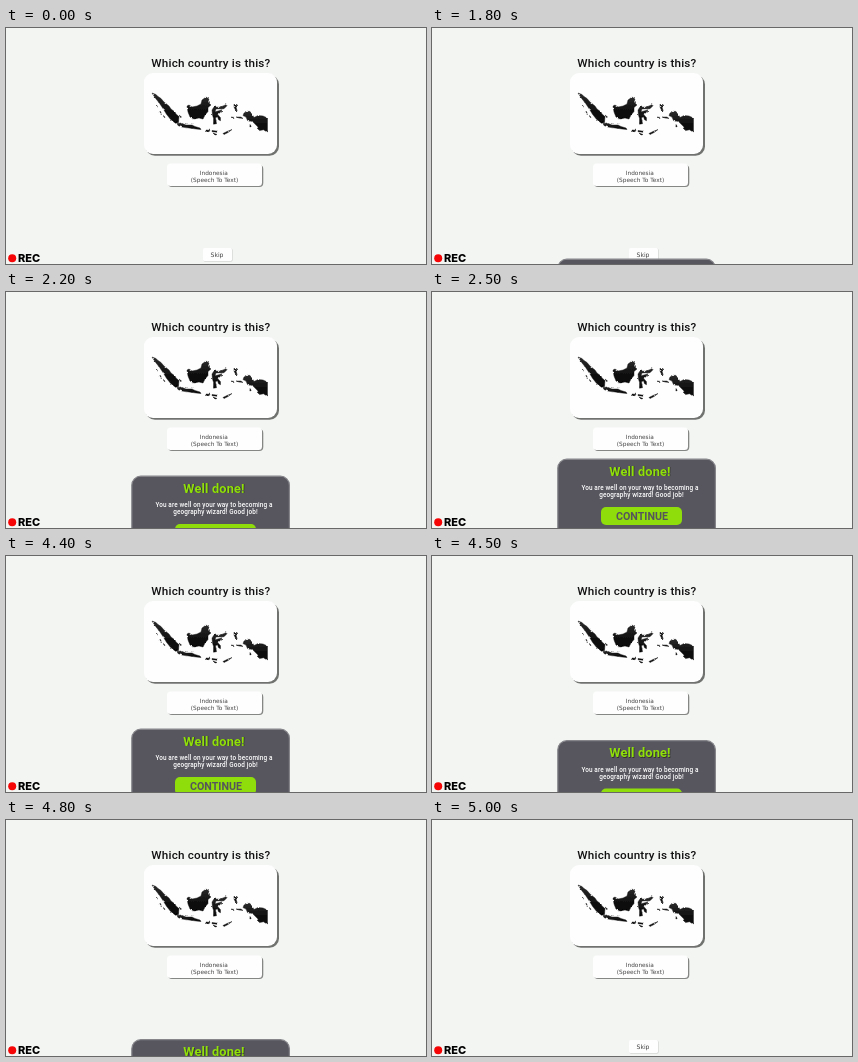
Write an HTML page that moves like this. It is 420 px wide and 236 px high and loops after 5.1 s.

```html
<!DOCTYPE html>
<html lang="en">
<head>
<meta charset="utf-8">
<title>Country quiz</title>
<style>
html, body { margin: 0; width: 100%; height: 100%; overflow: hidden; background: #f3f5f3; }
svg { display: block; width: 420px; height: 236px; }
text { text-anchor: middle; }
.bold { font-family: Roboto, sans-serif; font-weight: 700; }
.medium { font-family: Roboto, sans-serif; font-weight: 500; }
.ui { font-family: "DejaVu Sans", sans-serif; fill: #444; }
.rec { font: 800 11px Inter, sans-serif; text-anchor: start; }
.box { fill: #fdfefd; }
.land { fill: url(#ink); stroke: #0b0b0b; stroke-width: .4; filter: url(#coast); }

/* The panel moves at ten steps per second: up at 1.8 s, down at 4.4 s. */
.panel { animation: slide 5100ms step-end infinite; }
@keyframes slide {
  0% { transform: translateY(80px); }
  35.29% { transform: translateY(64px); }
  37.25% { transform: translateY(52.5px); }
  39.21% { transform: translateY(41px); }
  41.17% { transform: translateY(29px); }
  43.13% { transform: translateY(17px); }
  45.09% { transform: translateY(0); }
  86.27% { transform: translateY(6px); }
  88.23% { transform: translateY(17.5px); }
  90.19% { transform: translateY(29.2px); }
  92.15% { transform: translateY(41px); }
  94.11% { transform: translateY(52.5px); }
  96.07% { transform: translateY(63.5px); }
  98.03%, 100% { transform: translateY(80px); }
}
</style>
</head>
<body>
<svg viewBox="0 0 420 236">
  <defs>
    <linearGradient id="ink" x1="0" y1="0" x2="0" y2="1">
      <stop offset="0" stop-color="#2a2a2a"/>
      <stop offset=".6" stop-color="#101010"/>
      <stop offset="1" stop-color="#050505"/>
    </linearGradient>
    <filter id="coast">
      <feTurbulence type="fractalNoise" baseFrequency=".35" seed="4"/>
      <feDisplacementMap in="SourceGraphic" scale="2.5" xChannelSelector="R" yChannelSelector="G"/>
    </filter>
  </defs>

  <text class="medium" x="204.900" y="38.800" font-size="11.7" letter-spacing=".2" fill="#111">Which country is this?</text>

  <rect x="139.500" y="47" width="133.500" height="80.800" rx="9.500" fill="#707270"/>
  <rect class="box" x="138" y="45" width="133" height="81" rx="9"/>

  <g class="land">
    <path d="M146 65l4 1.500 2 2 3 2 3 3.500 5 4 2 3 4 3 1 2 3 2.500-.5 6-3 .8-5-4-4-5-3-5-4-6-4-5z"/>
    <path d="M171 95.500l4-.5 5 2 6 0 3 1.500 5 1.500 1 1.500-5-.5-7-1-7-1-4-1.500z"/>
    <path d="M181 78l2-1 3 2 5-1 4-2 1-4 4-3 3 2-1 3 3 3-3 2.500 0 4-3 3.500-2 4-4-1-5 1-4-2-2-5z"/>
    <path d="M206 82l2-3 6 .2 6-2.500 1 1-3 3-8 .2-1 2.800 4-1 3-1-2 3-2.500 1.500 3 3.500 0 3-2-1-1-3-2 1 1 6-3 .5 0-6-1-3z"/>
    <path d="M228 76l1.500 1.500 1.500-1.500-.8 3.500 1 3.500-1.700-1-1.500-3z"/>
    <path d="M238 85l4-2 4 3 2 3.500 4-2 5 .5 4.500 2 0 14.300-4-2.500-4 .8-2-4-5-5-5-1-1.500-3.500-3-1.500z"/>
    <path d="M225 89l4 .5-2 1.200zM230 89l5 0 2 1.500-4-.5zM200 102l4 .2-1 1.500-3-.5zM206 102.500l6 .7-1 1-5-.5zM207 105l4 1.500-2 .5zM217 105.500l4-2 5-2-4 3-4 2z"/>
    <path d="M150.500 77l1 2-1-.5zM154 83l1.500 2.500-1-.5zM157.500 87.500l1.500 2-1-.3zM173 87l2.500 2-1 .5zM244 96.500l1.200 2-1.300.5z"/>
  </g>

  <rect x="162" y="137" width="95.300" height="22" rx="4" fill="#858785"/>
  <rect class="box" x="161" y="135.500" width="95" height="22.500" rx="3.500"/>
  <g class="ui" font-size="5.8">
    <text x="207.800" y="147">Indonesia</text>
    <text x="208.500" y="154">(Speech To Text)</text>
  </g>

  <rect x="197.500" y="220.500" width="29" height="13" rx="1.500" fill="#c8cac8"/>
  <rect class="box" x="197" y="220" width="29" height="13" rx="1.500"/>
  <text class="ui" x="211" y="229" font-size="6.1">Skip</text>

  <g class="panel">
    <rect x="125.800" y="167.200" width="157.600" height="90" rx="9" fill="#57565f" stroke="#85858a" stroke-width="1.2"/>
    <g class="bold">
      <text x="208.700" y="184.400" font-size="12.8" letter-spacing=".15" fill="#33352c">Well done!</text>
      <text x="208" y="183.600" font-size="12.8" letter-spacing=".15" fill="#90e00a">Well done!</text>
      <rect x="169" y="215" width="81" height="18" rx="5" fill="#8fdd0a"/>
      <text x="210" y="227.600" font-size="10.7" fill="#55545d">CONTINUE</text>
    </g>
    <g class="medium" font-size="6.4" letter-spacing=".12" fill="#fff">
      <text x="208" y="198.300">You are well on your way to becoming a</text>
      <text x="209.500" y="205.200">geography wizard! Good job!</text>
    </g>
  </g>

  <circle cx="6.200" cy="230.300" r="4" fill="#f50505"/>
  <text class="rec" x="12" y="234.200">REC</text>
</svg>
</body>
</html>
```
